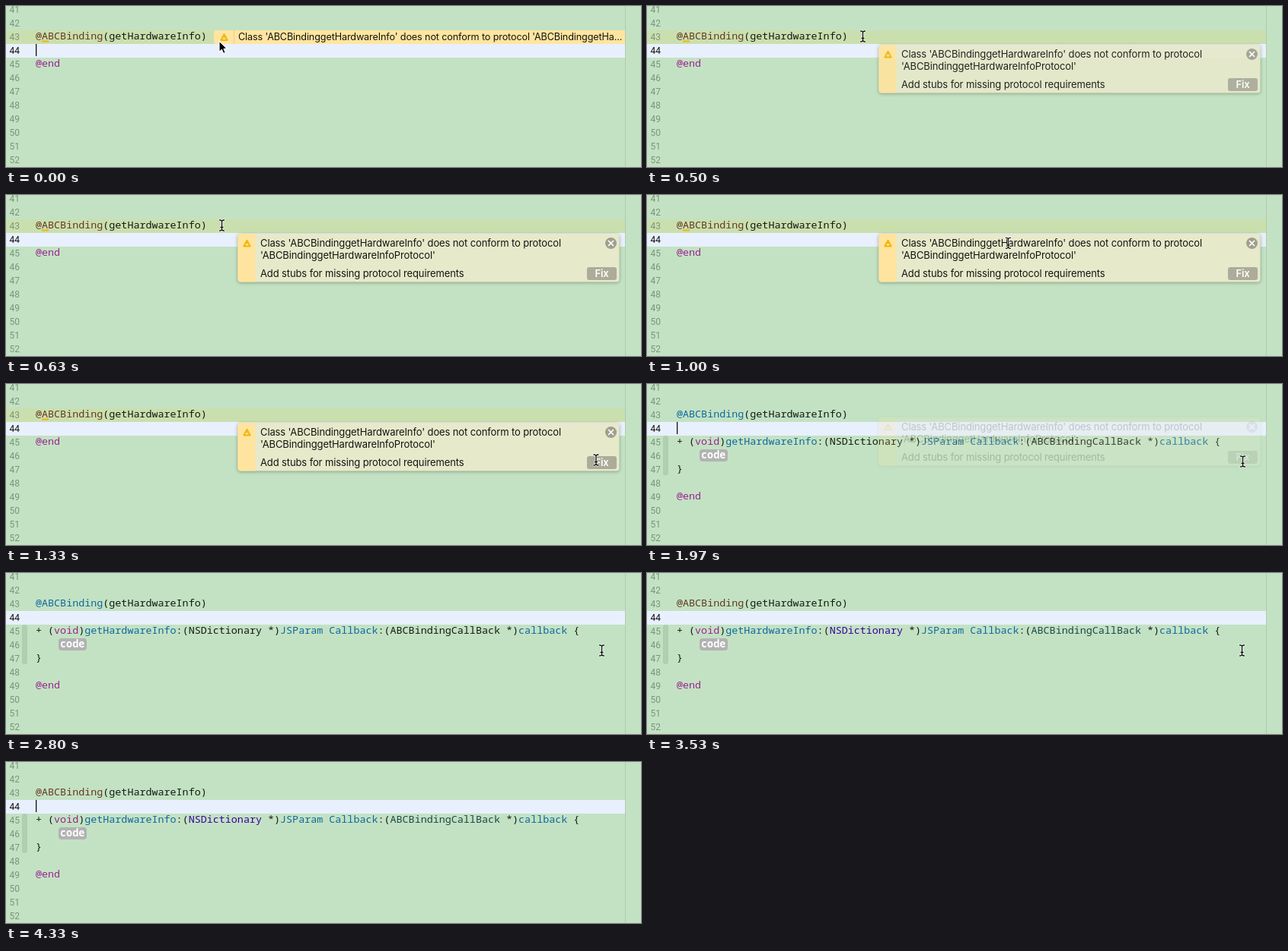
Write an HTML page that moves like this. It is 834 by 212 pixels and loops after 4.36 s.

```html
<!DOCTYPE html>
<html lang="en">
<head>
<meta charset="utf-8">
<title>Protocol stub fix</title>
<style>
  html, body { margin: 0; width: 100%; height: 100%; overflow: hidden; background: #c3e2c3; }
  svg { display: block; width: 834px; height: 212px; }
  text { white-space: pre; }
  .code { font: 500 13.38px "Noto Sans Mono", "DejaVu Sans Mono", monospace; fill: #141a14; }
  .num { font: 12px Roboto, "Liberation Sans", sans-serif; fill: #7c947e; text-anchor: end; }
  .num.now { fill: #111; }
  .ui { font: 13px Inter, "Liberation Sans", sans-serif; letter-spacing: -.12px; fill: #141410; }
  .ui.small { font-size: 12.62px; }
  .blue { fill: #0f68a0; }
  .pink { fill: #9b2393; }
  .macro { fill: #643820; }
  .type { fill: #3900a0; }
  .cls { fill: #1c464a; }
  .plain { fill: #141a14; }
  #popup { filter: drop-shadow(0 1px 2px rgba(60, 70, 40, .45)); }
</style>
</head>
<body>
<svg viewBox="0 0 834 212">
  <defs>
    <g id="warn">
      <path d="M0-4 4 3.3H-4Z" fill="#fff3c4" stroke="#f4b50c" stroke-width="2.2" stroke-linejoin="round"/>
      <path d="M0-1.5V1" stroke="#f4b50c" stroke-width="1.2"/>
    </g>
  </defs>

  <rect width="834" height="212" fill="#c3e2c3"/>
  <rect id="warnRow" y="32" width="813" height="18" fill="#cadfae"/>
  <rect y="50" width="813" height="18" fill="#e8f0fd"/>
  <path d="M813.5 0V212" stroke="#afcbb0"/>
  <rect id="changeBar" x="21" y="68" width="7" height="52" rx="3" fill="#afcfb1"/>
  <g id="numbers"></g>

  <text class="code" x="39" y="44"><tspan id="macro">@ABCBinding</tspan>(getHardwareInfo)</text>
  <rect id="underline" x="47" y="45.5" width="9" height="2" fill="#f4b50c"/>
  <text id="end" class="code pink" x="39">@end</text>

  <g id="stub">
    <text class="code" x="39" y="80">+ (<tspan class="pink">void</tspan>)<tspan class="blue">getHardwareInfo</tspan>:(<tspan id="type">NSDictionary</tspan> *)<tspan class="blue">JSParam</tspan> <tspan class="blue">Callback</tspan>:(<tspan id="cls">ABCBindingCallBack</tspan> *)<tspan class="blue">callback</tspan> {</text>
    <rect x="69" y="86" width="37" height="16" rx="4" fill="#b2b3b2"/>
    <text class="code" x="71.1" y="98" style="fill:#fff;font-weight:700">code</text>
    <text class="code" x="39" y="116">}</text>
  </g>

  <rect id="caret" x="39" y="50" width="1.3" height="16" fill="#111"/>

  <g id="inline">
    <path d="M276 32H813V50H276a3 3 0 0 1-3-3V35a3 3 0 0 1 3-3Z" fill="#ffe5a0"/>
    <path d="M299.5 32V50" stroke="#e9d291"/>
    <use href="#warn" x="286.5" y="41.5"/>
    <text class="ui small" x="305" y="45">Class 'ABCBindinggetHardwareInfo' does not conform to protocol 'ABCBindinggetHa...</text>
  </g>

  <g id="popup">
    <rect x="304.5" y="51" width="501" height="63.5" rx="4" fill="#e7e9cb"/>
    <path d="M327.5 51H308.5a4 4 0 0 0-4 4V110.500a4 4 0 0 0 4 4H327.5Z" fill="#fee49f"/>
    <use href="#warn" x="316.5" y="64"/>
    <text class="ui" x="334" y="68">Class 'ABCBindinggetHardwareInfo' does not conform to protocol</text>
    <text class="ui" x="334" y="84">'ABCBindinggetHardwareInfoProtocol'</text>
    <text class="ui" x="334" y="108">Add stubs for missing protocol requirements</text>
    <circle cx="794.5" cy="63.5" r="7.5" fill="#a09f8f"/>
    <path d="m791.5 60.500 6 6m0-6-6 6" stroke="#fff" stroke-width="1.7" stroke-linecap="round"/>
    <rect id="fixButton" x="763" y="95" width="39" height="17" rx="3" fill="#adac9a"/>
    <text class="ui" x="782.5" y="108" text-anchor="middle" style="fill:#fff;font-weight:600">Fix</text>
  </g>

  <path id="arrow" d="M0 0V14.5L3.4 11.4 5.7 16.6 8.2 15.5 6 10.4H10.4Z" fill="#000" stroke="#fff" stroke-width="1.1" stroke-linejoin="round"/>
  <g id="beam" fill="none" stroke-linecap="round">
    <path id="beamHalo" stroke="#fff" stroke-width="2.8" stroke-opacity=".75"/>
    <path id="beamCore" stroke="#111" stroke-width="1.3"/>
  </g>
</svg>
<script>
const LOOP = 4360;
const OPEN = 430, INSERT = 1800, FADE = 1850, CLOSED = 2000, COLORED = 2940, HIDE = 3900;

// Pointer stops: time, x, y
const ARROW_PATH = [[0, 280, 46], [60, 280, 46], [240, 282, 40]];
const BEAM_PATH = [
  [OPEN, 283.5, 40], [780, 283.5, 40], [1300, 775, 100],
  [1500, 775, 100], [1700, 782.5, 102], [3400, 782.5, 102], [3500, 781.5, 102]
];
const CARET_ON = [[0, 200], [1700, 2260], [2820, 3380], [3940, LOOP]];

const $ = id => document.getElementById(id);
const show = (id, on) => $(id).setAttribute('visibility', on ? 'visible' : 'hidden');
const clamp = v => Math.min(1, Math.max(0, v));
const progress = (t, from, to) => clamp((t - from) / (to - from));
const smooth = p => p * p * (3 - 2 * p);

function along(path, t) {
  let [, x, y] = path[0];
  for (let i = 1; i < path.length; i++) {
    const p = smooth(progress(t, path[i - 1][0], path[i][0]));
    x += (path[i][1] - path[i - 1][1]) * p;
    y += (path[i][2] - path[i - 1][2]) * p;
  }
  return [x, y];
}

function place(id, [x, y]) {
  $(id).setAttribute('transform', `translate(${x} ${y})`);
}

$('numbers').innerHTML = Array.from({ length: 12 }, (_, i) =>
  `<text class="num${i === 3 ? ' now' : ''}" x="18" y="${9 + 18 * i}">${41 + i}</text>`).join('');

const beamShape = 'M-3-7Q0-7 0-5Q0-7 3-7M0-5V5M-3 7Q0 7 0 5Q0 7 3 7M-1.5 2.5H1.5';
$('beamHalo').setAttribute('d', beamShape);
$('beamCore').setAttribute('d', beamShape);

function draw(t) {
  const inserted = t >= INSERT;
  const colored = t >= COLORED;

  show('warnRow', !inserted);
  show('underline', !inserted);
  show('stub', inserted);
  show('changeBar', inserted);
  $('end').setAttribute('y', inserted ? 152 : 80);
  $('macro').setAttribute('class', inserted && !colored ? 'blue' : 'macro');
  $('type').setAttribute('class', colored ? 'type' : 'plain');
  $('cls').setAttribute('class', colored ? 'cls' : 'plain');
  show('caret', CARET_ON.some(([from, to]) => t >= from && t < to));

  const leaving = progress(t, FADE, CLOSED);
  show('inline', t < OPEN);
  show('popup', t >= OPEN && t < CLOSED);
  $('popup').setAttribute('opacity', progress(t, OPEN - 40, OPEN + 80) * (1 - leaving));
  place('popup', [0, -8.75 * leaving]);
  $('fixButton').setAttribute('fill', t >= 1600 ? '#93927f' : '#adac9a');

  show('arrow', t < OPEN);
  place('arrow', along(ARROW_PATH, t));
  show('beam', t >= OPEN && t < HIDE);
  place('beam', along(BEAM_PATH, t));
}

const start = performance.now();
function tick() {
  draw((performance.now() - start) % LOOP);
  requestAnimationFrame(tick);
}
tick();
</script>
</body>
</html>
```
